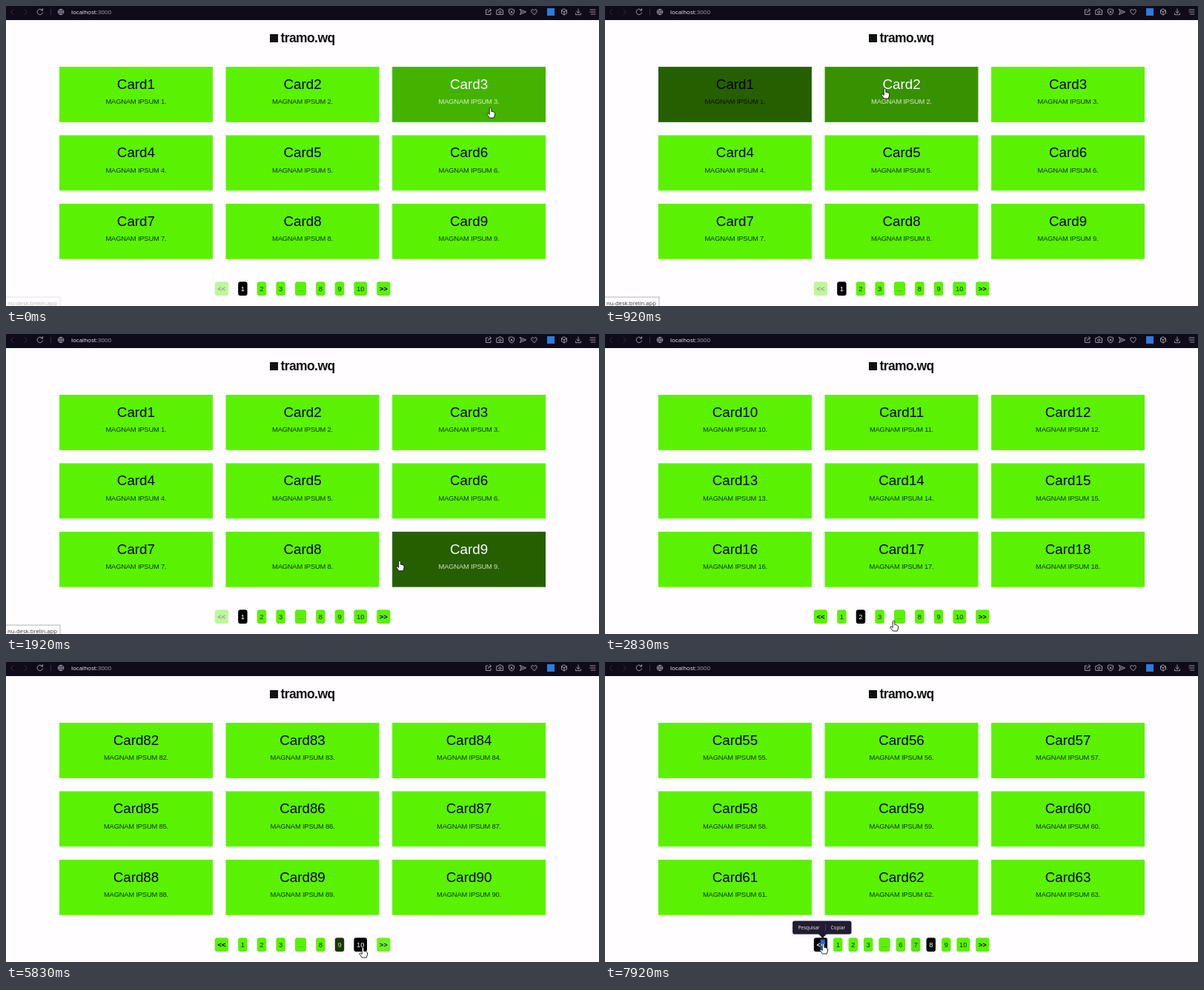
These frames come from a looping animation (800 by 405 pixels, 8000 ms). An HTML page:

```html
<!DOCTYPE html>
<html lang="en">
<head>
<meta charset="utf-8">
<title>Paged cards</title>
<style>
html, body { margin: 0; width: 100%; height: 100%; overflow: hidden; background: #fffdff; }
svg { display: block; width: 800px; height: 405px; }
text { font-family: "Liberation Sans", Arial, sans-serif; }
.ui { font-family: "Open Sans", sans-serif; }
.mid { text-anchor: middle; }
.icon { fill: none; stroke: #aaa5b5; stroke-width: .9; stroke-linecap: round; stroke-linejoin: round; }
.dim { stroke: #3a3546; }
</style>
</head>
<body>
<svg id="stage" viewBox="0 0 800 405">
  <rect width="800" height="405" fill="#fffdff"/>
  <rect width="800" height="19" fill="#100b18"/>
  <g class="icon">
    <path class="dim" d="M10 4.5L6.5 8L10 11.5M25 4.5L28.5 8L25 11.5M60.5 4V12"/>
    <path d="M49 5.6A3.8 3.8 0 1 0 49.6 9M49.6 3.6V6H47.2"/>
    <circle cx="74" cy="8" r="3.7"/>
    <path d="M70.3 8H77.7M74 4.3Q71 8 74 11.7Q77 8 74 4.3"/>
    <path d="M650 5H647.5V11.5H654V9M650 9Q650.5 6 654.5 5.5M652.5 3.7L654.7 5.5L652.7 7.3"/>
    <path d="M662.2 5.5H664L665 4H668L669 5.5H670.5V11.5H662.2Z"/>
    <circle cx="666.3" cy="8.3" r="1.6"/>
    <path d="M682 4L685.5 5V8Q685.5 11 682 12Q678.5 11 678.5 8V5ZM680.7 6.7L683.3 9.3M683.3 6.7L680.7 9.3"/>
    <path d="M693.5 4.5L701.5 8L693.5 11.5L695 8ZM695 8H698"/>
    <path d="M712.5 11.7L709 8Q707.8 5.8 709.7 4.7Q711.5 4.2 712.5 6Q713.5 4.2 715.3 4.7Q717.2 5.8 716 8Z"/>
    <path d="M753 4L756.5 6V10L753 12L749.5 10V6ZM749.5 6L753 8L756.5 6M753 8V12"/>
    <path d="M772 4V9.5M769.7 7.3L772 9.5L774.3 7.3M768.5 10V11.7H775.5V10"/>
    <path d="M788 5H795M788 8H795M789.5 11H795"/>
  </g>
  <rect x="730" y="3" width="10" height="10" fill="#2b7de0"/>
  <text class="ui" x="88" y="11" font-size="8" fill="#f2f0f5">localhost<tspan fill="#aaa5b3">:3000</tspan></text>
  <rect x="356" y="38" width="11" height="11" fill="#111"/>
  <text x="370.5" y="49" font-size="17.5" font-weight="700" letter-spacing="-.6" fill="#111">tramo.wq</text>
</svg>
<script>
const NS = 'http://www.w3.org/2000/svg';
const stage = document.getElementById('stage');
const LOOP = 8000, STEP = 5, REACT = 65;
const GREEN = [90, 242, 0], DARK = [38, 95, 0], BLACK = [0, 0, 0], WHITE = [255, 255, 255], INK = [12, 50, 0];
const FONT = 9.4, CARD = { w: 206.9, h: 74.7 }, PAGER = { x: 281.8, y: 372.2, w: 236.6, h: 18.8 };

// pointer moves: start, end, x, y; it rests in between
const moves = [
  [-250, 0, 653.5, 137], [0, 600, 200, 106], [600, 920, 377.5, 111], [920, 1110, 630, 155],
  [1110, 1500, 609.5, 274], [1650, 2400, 345.5, 381], [2570, 2700, 389.5, 387], [3000, 3300, 372, 383],
  [3400, 3750, 480, 381], [3780, 4000, 470, 381], [4420, 4580, 467.5, 380], [4850, 5150, 453, 383],
  [5600, 5740, 481.5, 385], [6670, 7270, 294.5, 380]
];
const clicks = [2560, 3330, 5200, 5793, 7370, 7680, 7915];

const clamp = v => Math.max(0, Math.min(1, v));
const ease = k => k * k * (3 - 2 * k);
const mix = (a, b, k) => `rgb(${a.map((v, i) => Math.round(v + (b[i] - v) * k))})`;
const inside = (px, py, x, y, w, h) => px >= x && px <= x + w && py >= y && py <= y + h;
const within = (t, spans = []) => spans.some(([a, b]) => t >= a && t < b);

// 0 to 1: rises at the start of a span, falls after its end
function level(t, spans = [], rise, lag, fall) {
  return Math.max(0, ...spans.map(([a, b]) =>
    t < a ? 0 : t < b ? clamp((t - a) / rise) : 1 - clamp((t - b - lag) / fall)));
}

function pointer(t) {
  let x = 810, y = 137;
  for (const [a, b, tx, ty] of moves) {
    const k = ease(clamp((t - a) / (b - a)));
    x += (tx - x) * k;
    y += (ty - y) * k;
  }
  return [x, y];
}

const cardX = i => 72 + (i % 3) * 224.55;
const cardY = i => 82.1 + Math.floor(i / 3) * 92.4;

function labelWidth(s) {
  const em = s === '...' ? .278 : /[<>]/.test(s) ? .584 : .556;
  return s.length * em * FONT + 7.2;
}

function pagerItems(page) {
  const names = ['<<'];
  let last = 0;
  for (let n = 1; n <= 10; n++) {
    if (n > 3 && n < 8 && Math.abs(n - page) > 1) continue;
    if (n - last > 1) names.push('...');
    names.push(String(n));
    last = n;
  }
  names.push('>>');
  const used = names.reduce((sum, s) => sum + labelWidth(s), 0);
  const gap = (PAGER.w - used) / (names.length - 1);
  let x = PAGER.x;
  return names.map(s => {
    const item = { s, x, w: labelWidth(s) };
    x += item.w + gap;
    return item;
  });
}

// Replay the pointer once to learn what is hovered, active and disabled when
const hovers = {}, pressed = {}, disabled = {}, history = [[-500, 1]];

function log(store, key, t) {
  const spans = store[key] ||= [], last = spans.at(-1);
  if (last && last[1] >= t) last[1] = t + STEP;
  else spans.push([t, t + STEP]);
}

function replay() {
  let page = 1, done = 0;
  for (let t = -500; t < LOOP; t += STEP) {
    const [px, py] = pointer(t);
    const over = pagerItems(page).find(b => inside(px, py, b.x, PAGER.y, b.w, PAGER.h));
    const off = page === 1 ? '<<' : page === 10 ? '>>' : '';
    const target = over && over.s !== '...' && over.s !== off ? over.s : '';
    if (t >= clicks[done]) {
      done++;
      page = target === '<<' ? page - 1 : target === '>>' ? page + 1 : Number(target) || page;
      history.push([t, page]);
    }
    log(pressed, page, t);
    if (target && target !== String(page)) log(pressed, target, t);
    if (off) log(disabled, off, t);
    for (let i = 0; i < 9; i++) {
      if (inside(px, py, cardX(i), cardY(i), CARD.w, CARD.h)) log(hovers, i, t + REACT);
    }
  }
}
replay();
const linked = Object.values(hovers).flat();

function set(node, attrs) {
  for (const k in attrs) node.setAttribute(k, attrs[k]);
  return node;
}
function add(parent, tag, attrs, label) {
  const node = set(document.createElementNS(NS, tag), attrs);
  if (label) node.textContent = label;
  parent.appendChild(node);
  return node;
}
function write(node, label) {
  if (node.textContent !== label) node.textContent = label;
}

const cards = Array.from({ length: 9 }, (_, i) => {
  const x = cardX(i), y = cardY(i), mid = x + CARD.w / 2;
  return {
    box: add(stage, 'rect', { x, y, width: CARD.w, height: CARD.h }),
    title: add(stage, 'text', { class: 'mid', x: mid, y: y + 29.9, 'font-size': FONT * 2 }),
    note: add(stage, 'text', {
      class: 'mid', x: mid, y: y + 50.2, 'font-size': FONT, 'letter-spacing': -.2, opacity: .8
    })
  };
});

const buttons = Array.from({ length: 11 }, () => {
  const g = add(stage, 'g', {});
  return {
    g,
    box: add(g, 'rect', { y: PAGER.y, height: PAGER.h, rx: 3 }),
    label: add(g, 'text', { class: 'mid', y: 385, 'font-size': FONT })
  };
});

const status = add(stage, 'g', {});
add(status, 'rect', { x: -1, y: 393, width: 74, height: 14, fill: '#fffdff', stroke: '#b5b2b8' });
add(status, 'text', { class: 'ui', x: 2, y: 404, 'font-size': 7.7, fill: '#333' }, 'nu-desk.brelin.app');

const popup = add(stage, 'g', {});
const item = { class: 'ui', y: 360.5, 'font-size': 6.4, fill: '#f1eef5' };
add(popup, 'path', { d: 'M288 367H299L293.5 373Z', fill: '#231a33' });
add(popup, 'rect', { x: 253, y: 349.5, width: 79.5, height: 18, rx: 3, fill: '#231a33' });
add(popup, 'path', { d: 'M297.5 354V363', stroke: '#51485f', 'stroke-width': .8 });
add(popup, 'text', { ...item, x: 260.5 }, 'Pesquisar');
add(popup, 'text', { ...item, x: 304.5 }, 'Copiar');
add(popup, 'rect', { x: 290.8, y: 374.5, width: 6, height: 14, fill: '#1c6fd6' });
add(popup, 'text', { x: 291, y: 385, 'font-size': FONT, 'font-weight': 700, fill: '#fff' }, '<');

const hand = add(stage, 'path', {
  d: 'M-1.3 1Q0 -.6 1.3 1V5.3L3 5.5L4.7 6.2L6 7.2V10L4.8 14H-1L-4.6 9.2Q-4.6 7.5 -3 8L-1.3 9.5Z',
  fill: '#fff', stroke: '#111', 'stroke-width': .9, 'stroke-linejoin': 'round'
});

function drawPager(t, page) {
  const items = pagerItems(page);
  buttons.forEach(({ g, box, label }, i) => {
    set(g, { visibility: items[i] ? 'visible' : 'hidden' });
    if (!items[i]) return;
    const { s, x, w } = items[i], bold = /[<>]/.test(s);
    const k = level(t, pressed[s], 120, 0, 150);
    set(g, { opacity: 1 - .6 * level(t, disabled[s], 150, 0, 150) });
    set(box, { x, width: w, fill: mix(GREEN, BLACK, k) });
    set(label, {
      x: x + w / 2,
      fill: s === '...' ? '#2f8a10' : mix(bold ? BLACK : INK, WHITE, k),
      'font-weight': bold ? 700 : 400
    });
    write(label, s);
  });
}

function drawCards(t, page) {
  cards.forEach(({ box, title, note }, i) => {
    const n = (page - 1) * 9 + i + 1;
    const fill = within(t, hovers[i]) ? '#fff' : '#000';
    set(box, { fill: mix(GREEN, DARK, level(t, hovers[i], 130, 110, 230)) });
    set(title, { fill });
    set(note, { fill });
    write(title, 'Card' + n);
    write(note, `MAGNAM IPSUM ${n}.`);
  });
}

function draw(t) {
  const page = history.findLast(h => h[0] <= t)[1];
  drawCards(t, page);
  drawPager(t, page);
  set(hand, { transform: `translate(${pointer(t)})` });
  set(status, { opacity: level(t, linked, 160, 200, 200) });
  set(popup, { visibility: t > clicks.at(-2) + 80 ? 'visible' : 'hidden' });
}

const start = performance.now();
function tick() {
  draw((performance.now() - start) % LOOP);
  requestAnimationFrame(tick);
}
tick();
</script>
</body>
</html>
```
